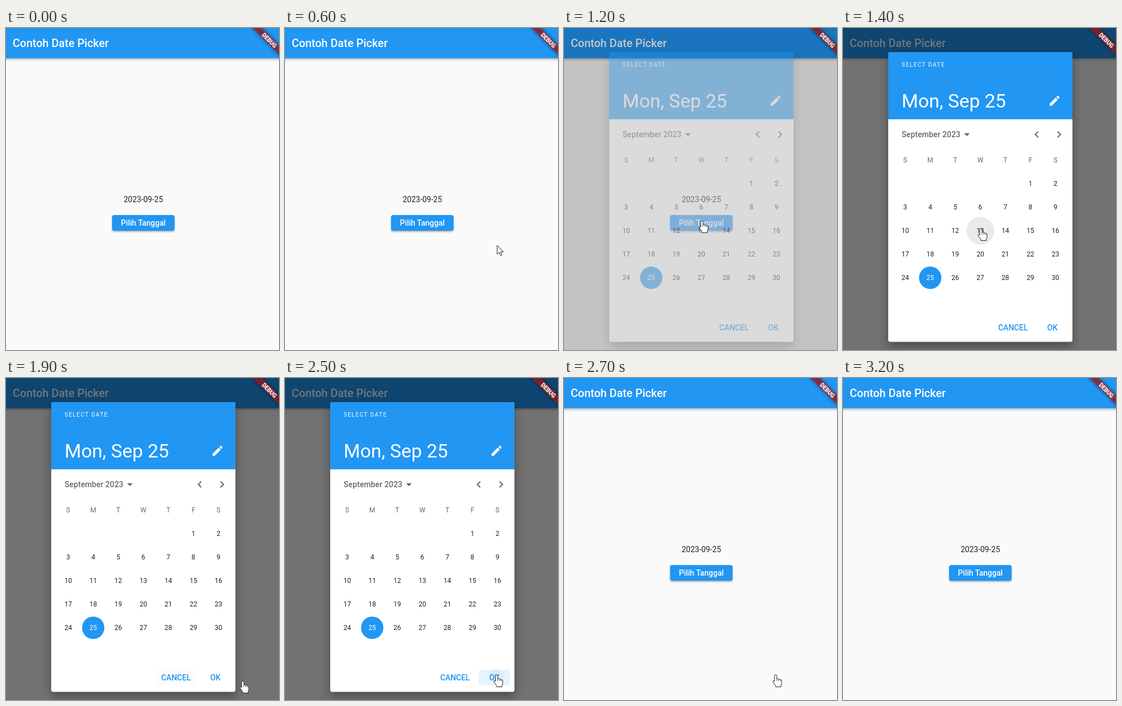
These frames come from a looping animation (489 by 575 pixels, 3.5 s). An HTML page:

```html
<!DOCTYPE html>
<html lang="id">
<head>
<meta charset="utf-8">
<title>Contoh Date Picker</title>
<style>
html, body { margin: 0; width: 100%; height: 100%; overflow: hidden; background: #fafafa; }
svg { display: block; width: 489px; height: 575px; font: 14px Roboto, sans-serif; }
.blue { fill: #2196f3; }
.white { fill: #fff; }
.ink { fill: #000; fill-opacity: .87; }
.soft { fill: #000; fill-opacity: .6; }
.mid { text-anchor: middle; }
.bold { font-weight: 500; }
.small { font-size: 12px; }
.bar { filter: drop-shadow(0 2px 2px rgba(0,0,0,.32)); }
.raised { filter: drop-shadow(0 2px 1.5px rgba(0,0,0,.3)); }
.sheet { filter: drop-shadow(0 8px 9px rgba(0,0,0,.35)); }
.blur { filter: blur(3px); }

/* Every change lands on a 100 ms tick, so all tracks hold between keys. */
.anim { animation: 3500ms step-end infinite; }
#btnHover { opacity: 0; animation-name: btnHover; }
#scrim { opacity: 0; animation-name: scrim; }
#dialog { opacity: 0; animation-name: dialog; }
#dayHover { opacity: 0; animation-name: dayHover; }
#cancelHover { opacity: 0; animation-name: cancelHover; }
#okHover { opacity: 0; animation-name: okHover; }
#ripple { opacity: 0; animation-name: ripple; }
#cursor { visibility: hidden; animation-name: move; }
#arrow { visibility: inherit; animation-name: arrow; }
#hand { opacity: 0; animation-name: hand; }

@keyframes btnHover { 0% { opacity: 0 } 22.85% { opacity: .08 } 39.99%, 100% { opacity: 0 } }
@keyframes scrim {
  0% { opacity: 0 } 34.28% { opacity: .22 } 37.14% { opacity: .5 } 39.99% { opacity: .54 }
  74.28% { opacity: .31 } 77.14%, 100% { opacity: 0 }
}
@keyframes dialog {
  0% { opacity: 0 } 34.28% { opacity: .4 } 37.14% { opacity: .93 } 39.99% { opacity: 1 }
  74.28% { opacity: .5 } 77.14%, 100% { opacity: 0 }
}
@keyframes dayHover { 0% { opacity: 0 } 37.14% { opacity: .04 } 39.99% { opacity: .08 } 48.57%, 100% { opacity: 0 } }
@keyframes cancelHover { 0% { opacity: 0 } 51.42% { opacity: .04 } 54.28% { opacity: .02 } 57.14%, 100% { opacity: 0 } }
@keyframes okHover { 0% { opacity: 0 } 59.99% { opacity: .04 } 68.57% { opacity: .07 } 71.42%, 100% { opacity: .1 } }
@keyframes ripple {
  0% { opacity: 0; transform: scale(.4) }
  71.42% { opacity: .09; transform: scale(1) }
  74.28%, 100% { opacity: .06; transform: scale(2) }
}
@keyframes move {
  0% { visibility: hidden; transform: translate(480px, 424px) }
  11.42% { visibility: visible; transform: translate(474px, 424px) }
  14.28% { visibility: visible; transform: translate(435px, 408px) }
  17.14% { visibility: visible; transform: translate(380px, 388px) }
  19.99% { visibility: visible; transform: translate(318px, 366px) }
  22.85% { visibility: visible; transform: translate(265px, 350px) }
  25.71% { visibility: visible; transform: translate(247px, 344px) }
  37.14% { visibility: visible; transform: translate(247px, 350px) }
  39.99% { visibility: visible; transform: translate(247px, 358px) }
  48.57% { visibility: visible; transform: translate(264px, 410px) }
  51.42% { visibility: visible; transform: translate(328px, 522px) }
  54.28% { visibility: visible; transform: translate(424px, 541px) }
  57.14% { visibility: visible; transform: translate(414px, 541px) }
  59.99% { visibility: visible; transform: translate(392px, 535px) }
  62.85% { visibility: visible; transform: translate(379px, 530px) }
  82.85% { visibility: visible; transform: translate(396px, 520px) }
  85.71% { visibility: visible; transform: translate(432px, 492px) }
  88.57% { visibility: visible; transform: translate(472px, 456px) }
  91.42%, 100% { visibility: hidden; transform: translate(489px, 440px) }
}
@keyframes arrow { 0% { opacity: 1 } 22.85% { opacity: 0 } 82.85%, 100% { opacity: 1 } }
@keyframes hand { 0% { opacity: 0 } 22.85% { opacity: 1 } 82.85%, 100% { opacity: 0 } }
</style>
</head>
<body>
<svg viewBox="0 0 489 575">
  <rect width="489" height="575" fill="#fafafa"/>
  <rect class="blue bar" x="-10" y="-10" width="510" height="64"/>
  <text class="white bold" x="12" y="34" font-size="20">Contoh Date Picker</text>
  <text class="ink mid" x="246" y="311">2023-09-25</text>
  <rect class="blue raised" x="190" y="334" width="112" height="28" rx="4"/>
  <rect id="btnHover" class="white anim" x="190" y="334" width="112" height="28" rx="4"/>
  <text class="white mid bold" x="246" y="353">Pilih Tanggal</text>

  <rect id="scrim" class="anim" width="489" height="575"/>

  <g id="dialog" class="anim">
    <rect class="white sheet" x="81" y="43" width="330" height="517.5" rx="4"/>
    <path class="blue" d="M81 163V47q0-4 4-4H407q4 0 4 4V163z"/>
    <text class="white" x="105" y="69" font-size="10" letter-spacing="1.5">SELECT DATE</text>
    <text class="white" x="105" y="142" font-size="34">Mon, Sep 25</text>
    <path class="white" transform="translate(367 118)" d="M3 17.25V21h3.75L17.81 9.94l-3.75-3.75zM20.71 7.04c.39-.39.39-1.02 0-1.41l-2.34-2.34c-.39-.39-1.02-.39-1.41 0l-1.83 1.83 3.75 3.75z"/>

    <text class="soft bold" x="105" y="195" letter-spacing=".1">September 2023</text>
    <path class="soft" d="M217 188l5 5 5-5z"/>
    <path id="chevron" class="soft" d="M350.4 185.4L349 184l-6 6 6 6 1.4-1.4-4.6-4.6z"/>
    <use href="#chevron" transform="translate(734 0) scale(-1 1)"/>

    <circle class="blue" cx="156.2" cy="446" r="20"/>
    <g id="days" class="small mid"></g>
    <circle id="dayHover" class="anim" cx="246" cy="362" r="25"/>

    <rect id="cancelHover" class="blue anim" x="270" y="521" width="69" height="28" rx="4"/>
    <rect id="okHover" class="blue anim" x="347" y="521" width="56" height="28" rx="4"/>
    <clipPath id="okClip"><rect x="347" y="521" width="56" height="28" rx="4"/></clipPath>
    <g clip-path="url(#okClip)">
      <g transform="translate(379 532)"><circle id="ripple" class="blue anim" r="13"/></g>
    </g>
    <text class="blue mid bold" x="304.5" y="540">CANCEL</text>
    <text class="blue mid bold" x="375" y="540">OK</text>
  </g>

  <g transform="translate(496 -2) rotate(45)">
    <rect class="blur" x="-40" y="28" width="80" height="12" fill-opacity=".5"/>
    <rect x="-40" y="28" width="80" height="12" fill="#b71c1c" fill-opacity=".627"/>
    <text class="white mid" y="37.6" font-size="10.2" font-weight="900">DEBUG</text>
  </g>

  <g id="cursor" class="anim" fill="#fff" stroke="#222" stroke-linejoin="round">
    <path id="arrow" class="anim" d="M0 0V16L3.7 12.6 6.2 18.4 8.6 17.4 6.1 11.7H11.2z"/>
    <g id="hand" class="anim">
      <path d="M-2 2Q-2 0 0 0T2 2V7Q4 6 5.4 7.8Q7.4 7 8.4 8.8Q11 8.4 11 11V15Q11 17 9.6 19V21.5H0V19.5L-4.6 13Q-5.6 11-4 10.6Q-3 10.4-2 12Z"/>
      <path fill="none" stroke-width=".8" d="M2 7V11M5.4 7.8V11M8.4 8.8V11.5"/>
    </g>
  </g>
</svg>
<script>
const days = document.getElementById('days');

function cell(label, col, y, cls) {
  const t = document.createElementNS('http://www.w3.org/2000/svg', 'text');
  t.setAttribute('x', 111.4 + col * 44.86);
  t.setAttribute('y', y + 4.3);
  t.setAttribute('class', cls);
  t.textContent = label;
  days.append(t);
}

[...'SMTWTFS'].forEach((name, col) => cell(name, col, 236, 'soft'));
for (let d = 1; d <= 30; d++) {
  const slot = d + 4; // the month starts on a Friday
  cell(d, slot % 7, 278 + 42 * Math.floor(slot / 7), d === 25 ? 'white' : 'ink');
}
</script>
</body>
</html>
```
